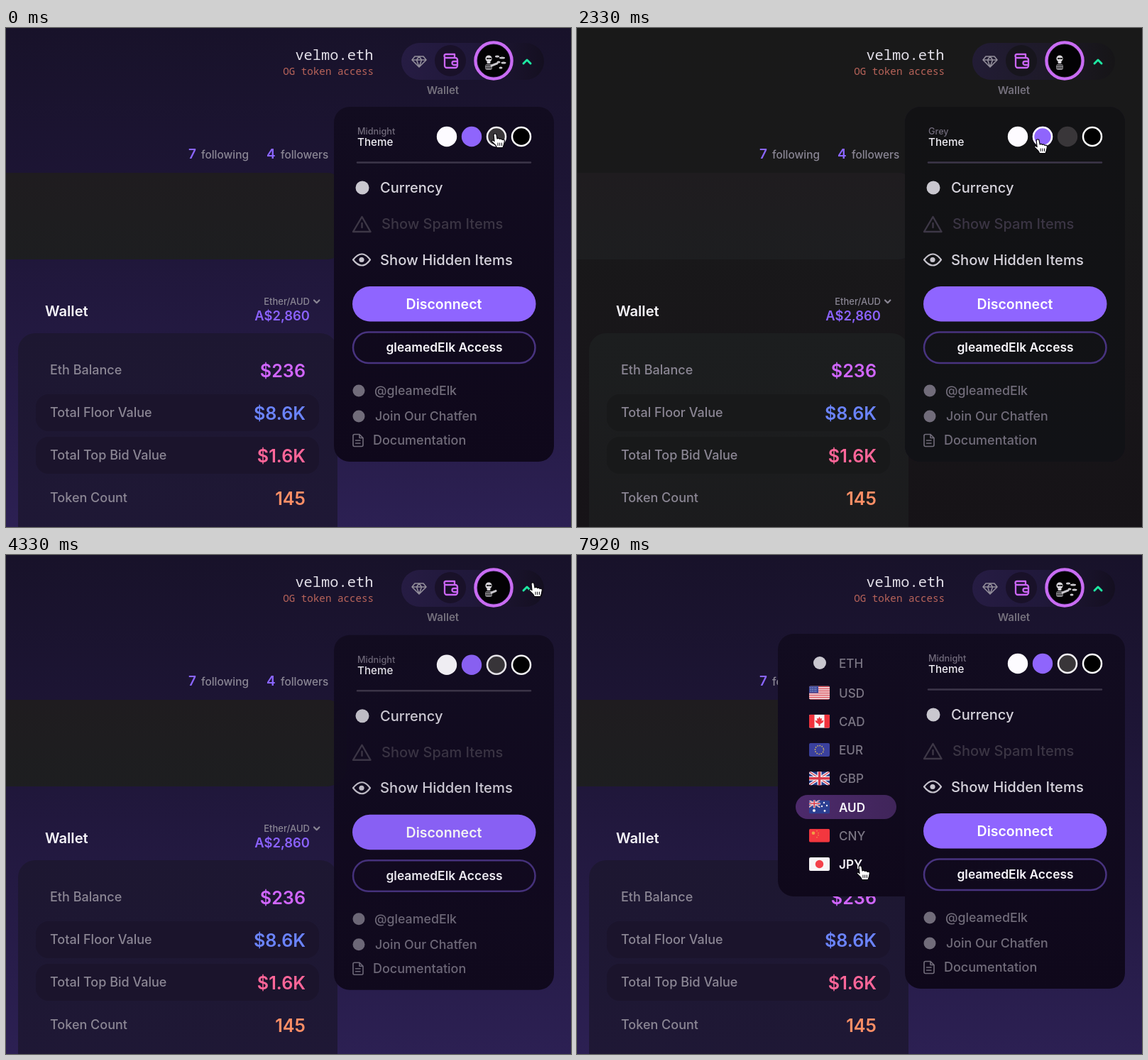
An HTML page for the animation above (8000 ms loop, 796 by 703 pixels).

```html
<!DOCTYPE html>
<html lang="en">
<head>
<meta charset="utf-8">
<title>Wallet menu</title>
<style>
html, body { margin: 0; width: 100%; height: 100%; overflow: hidden; background: #1a1430; }
svg { display: block; width: 796px; height: 703px; }
text { font-family: Inter, "Open Sans", sans-serif; }
.mono { font-family: "Noto Sans Mono", "Liberation Mono", monospace; }
</style>
</head>
<body>
<svg id="stage" viewBox="0 0 796 703" fill="none" stroke-linecap="round" stroke-linejoin="round"></svg>
<script>
const LOOP = 8000, STEP = 1000 / 12;
const stage = document.getElementById('stage');

// Markup helpers
const text = (x, y, size, fill, str, weight = 500, attrs = '') =>
  `<text x="${x}" y="${y}" font-size="${size}" fill="${fill}" font-weight="${weight}" ${attrs}>${str}</text>`;
const rect = (x, y, w, h, r, fill, attrs = '') =>
  `<rect x="${x}" y="${y}" width="${w}" height="${h}" rx="${r}" fill="${fill}" ${attrs}/>`;
const dot = (x, y, r, fill, attrs = '') => `<circle cx="${x}" cy="${y}" r="${r}" fill="${fill}" ${attrs}/>`;
const line = (d, stroke, width, attrs = '') =>
  `<path d="${d}" stroke="${stroke}" stroke-width="${width}" ${attrs}/>`;
const gradient = (id, colors, across) =>
  `<linearGradient id="${id}" x2="${across ? 1 : 0}" y2="${across ? 0 : 1}">` +
  colors.map((c, i) => `<stop offset="${i / (colors.length - 1)}" stop-color="${c}"/>`).join('') +
  '</linearGradient>';
const END = 'text-anchor="end"', MID = 'text-anchor="middle"';

const themes = {
  night: { page: ['#18122a', '#1d1535', '#241a43', '#2c2053'], band: ['#1b1528', '#1a1429'],
    card: ['#1d1731', '#1f1836'], row: '#1b142c', pill: ['#261c43', '#20183a', '#140f20'],
    hole: '#191129', panel: ['#120c20', '#0f081b'] },
  grey: { page: ['#191919', '#19191a', '#181619', '#161317'], band: ['#1f1c1f', '#1d1e20'],
    card: ['#1c1e1f', '#1b1b1d'], row: '#18191a', pill: ['#221c35', '#1e1a29', '#161517'],
    hole: '#17151d', panel: ['#121214', '#111216'] }
};

const themeDefs = Object.entries(themes).map(([name, c]) =>
  gradient(name + 'Page', c.page) + gradient(name + 'Band', c.band) + gradient(name + 'Card', c.card) +
  gradient(name + 'Pill', c.pill, true) + gradient(name + 'Panel', c.panel)).join('');

const band = name => rect(-40, 204, 520, 122, 28, `url(#${name}Band)`);
const page = name => {
  const c = themes[name];
  return rect(0, 0, 796, 703, 0, `url(#${name}Page)`) +
    rect(17, 430, 450, 320, 24, `url(#${name}Card)`) +
    rect(42, 516, 399, 52, 18, c.row) + rect(42, 576, 399, 52, 18, c.row) +
    rect(557, 21, 201, 52, 26, `url(#${name}Pill)`) + dot(626, 46, 22, c.hole);
};

const stats = [
  ['Eth Balance', '$236', '#d166ff', 488], ['Total Floor Value', '$8.6K', '#6b84ff', 548],
  ['Total Top Bid Value', '$1.6K', '#ff6699', 608], ['Token Count', '145', '#ff8f66', 668]
];

const header =
  text(517.5, 45, 20.4, '#e4e1ea', 'velmo.eth', 300, `class="mono" ${END}`) +
  text(518, 66, 14.2, '#b9645a', 'OG token access', 400, `class="mono" ${END}`) +
  line('M576 40h12l4 5-10 10-10-10zM572 45h20M578.5 45l3.500 10 3.500-10-3.500-5z', '#928e9a', 1.6) +
  line('M618 41v12a3 3 0 0 0 3 3h12a3 3 0 0 0 3-3v-8a3 3 0 0 0-3-3h-13a2.500 2.500 0 0 1 0-5h12v4M636 47h-5a2 2 0 0 0 0 5h5',
    '#cb66f5', 2.3) +
  text(615.5, 93, 15.1, '#74707c', 'Wallet', 600, MID);

const summary =
  text(257, 184, 19, '#8b66ff', '7', 600) + text(275, 184, 15.4, '#8a8694', 'following') +
  text(367, 184, 19, '#8b66ff', '4', 600) + text(387, 184, 15.4, '#8a8694', 'followers') +
  text(55, 406, 20.2, '#f5f3f8', 'Wallet', 600) +
  text(428, 390, 13, '#8a8694', 'Ether/AUD', 500, END) + line('M434 383.500l3.700 3.700 3.700-3.700', '#8a8694', 2.2) +
  text(428, 412, 18.4, '#8b62ff', 'A$2,860', 600, END) +
  stats.map(([label, value, color, y]) =>
    text(62, y, 18, '#8b8694', label) + text(422, y + 4, 25.2, color, value, 600, END)).join('');

const avatar =
  dot(687, 46, 22.5, '#030204') +
  '<g id="figure" fill="#d8d6da"><circle cx="680" cy="43" r="4.600"/><rect x="677.500" y="47" width="5" height="3" rx="1"/>' +
  '<rect x="675" y="51" width="10" height="8" rx="3" fill="#8d8b90"/><path d="M676 53h8M676 56h8" stroke="#111" stroke-width="1"/>' +
  '<path d="M678 43h1.500M681.500 43h1.500" stroke="#111" stroke-width="2"/></g>' +
  line('M684 53', '#c9c7cc', 3, 'id="arm"') +
  '<g id="flecks">' + [[692, 40, 3], [699, 42, 4], [694, 48, 2.5], [701, 49, 3.5], [697, 56, 2.5]].map(
    ([x, y, r]) => `<ellipse cx="${x}" cy="${y}" rx="${r}" ry="1.500" fill="#c9c7cc"/>`).join('') + '</g>' +
  '<circle id="glow" stroke="#1ee8a2" stroke-width="3.500"/><circle id="ring" stroke="#c96cf3"/>' +
  line('', '#000', 3, 'id="chevron"');

// Flags share a 29 by 19 box
const jack = '<rect width="29" height="19" fill="#28408f"/>' +
  line('M0 0L29 19M29 0L0 19', '#f2f0f4', 4) + line('M0 0L29 19M29 0L0 19', '#d83a4a', 1.3) +
  line('M14.500 0v19M0 9.500h29', '#f2f0f4', 6) + line('M14.500 0v19M0 9.500h29', '#d83a4a', 3.4);
const field = color => `<rect width="29" height="19" fill="${color}"/>`;
const flags = {
  USD: field('#f4f1f4') + line('M0 1h29M0 4h29M0 7h29M0 10h29M0 13h29M0 16h29M0 19h29', '#db4650', 1.5) +
    rect(0, 0, 13, 10, 0, '#3f4b9b') + line('M2 2.500h10M2 5h10M2 7.500h10', '#d8d8ec', 1, 'stroke-dasharray="0.1 2.400"'),
  CAD: field('#f7f4f5') + rect(0, 0, 7.5, 19, 0, '#f0323c') + rect(21.5, 0, 7.5, 19, 0, '#f0323c') +
    '<path d="M14.500 3l1.500 3 2-1-.5 4 3-1-1 3-4 2.500v2.500h-2v-2.500l-4-2.500-1-3 3 1-.5-4 2 1z" fill="#f0323c"/>',
  EUR: field('#3a409d') + '<circle cx="14.500" cy="9.500" r="6" stroke="#d4b95c" stroke-width="1.700" stroke-dasharray="0.100 3.042"/>',
  GBP: jack,
  AUD: field('#2b3f92') + `<g transform="scale(.5)">${jack}</g>` +
    [[7, 14.5, 2], [21, 3.5, 1.2], [25, 7.5, 1.2], [18, 8.5, 1.2], [22, 15, 1.4]].map(s => dot(...s, '#eceaf3')).join(''),
  CNY: field('#f3373f') + dot(6, 6, 2.3, '#f0a046') +
    [[11, 3], [13, 6], [13, 9], [11, 12]].map(([x, y]) => dot(x, y, .8, '#f0a046')).join(''),
  JPY: field('#f8f5f7') + dot(14.5, 9.5, 5.7, '#f4414b')
};
const codes = ['ETH', ...Object.keys(flags)];
const rowY = i => i ? 194 + (i - 1) * 40.25 : 152;

const submenu = '<g id="submenu">' +
  rect(283, 111, 220, 370, 22, 'url(#nightPanel)') +
  rect(283, 111, 220, 370, 22, 'url(#greyPanel)', 'class="greyFade"') +
  rect(308, 338, 142, 34, 17, 'url(#chosen)') +
  codes.map((code, i) =>
    (i ? `<g transform="translate(327 ${rowY(i) - 9.5})" clip-path="url(#flagBox)">${flags[code]}</g>`
       : dot(342, 152, 9, '#c9c7cf')) +
    text(369, rowY(i) + 6.5, 17.1, '#7b7684', code, 500, 'class="code"')).join('') + '</g>';

const panel = '<g id="panel">' + submenu +
  rect(462, 111, 310, 500, 22, 'url(#nightPanel)') +
  rect(462, 111, 310, 500, 22, 'url(#greyPanel)', 'class="greyFade"') +
  text(495, 150, 12.7, '#716b7b', '', 500, 'id="themeName"') +
  text(495, 166, 15.2, '#f0eef4', 'Theme') +
  dot(621, 153, 14.2, '#fdfbff') +
  dot(656, 153, 14.2, '#8f65fc') + dot(656, 153, 13, 'none', 'id="purpleRing" stroke="#fff" stroke-width="2.500"') +
  dot(691, 153, 14.2, '#393639') + dot(691, 153, 13, 'none', 'id="greyRing" stroke="#f2f0f4" stroke-width="2.500"') +
  dot(726, 153, 13, '#000', 'stroke="#fff" stroke-width="2.500"') +
  line('M495 189.500H739', '#3d3649', 2.4) +
  dot(502, 225, 9.5, '#c9c7cf') + text(527, 232, 20, '#d6d3dc', 'Currency') +
  line('M501.500 266l12 21h-24.500zM501.500 275v6', '#3d3746', 2.4) + text(529, 283, 20, '#3b3544', 'Show Spam Items') +
  line('M489 326.500q12.500-16 24 0q-11.500 16-24 0z', '#c6c3cc', 2.2) + dot(501, 326.5, 3.6, '#c6c3cc') +
  text(527, 333.5, 20.2, '#d6d3dc', 'Show Hidden Items') +
  rect(488, 364, 258.5, 49.5, 24.7, '#8f65ff') + text(617, 396, 19.5, '#fff', 'Disconnect', 600, MID) +
  rect(489, 428.5, 256.5, 43.5, 21.7, 'none', 'stroke="#48337f" stroke-width="2.500"') +
  text(617.5, 456, 17.4, '#f7f5fa', 'gleamedElk Access', 600, MID) +
  dot(497, 511, 8.5, '#716c7a') + text(519, 517, 17.8, '#716c7a', '@gleamedElk') +
  dot(497, 547, 8.5, '#716c7a') + text(520, 553, 17.8, '#716c7a', 'Join Our Chatfen') +
  line('M498 572.500h-7a2 2 0 0 0-2 2v13a2 2 0 0 0 2 2h10a2 2 0 0 0 2-2v-10zv5h5M492.500 581h6.500M492.500 585h6.500', '#716c7a', 1.6) +
  text(517, 587, 18, '#716c7a', 'Documentation') + '</g>';

const cursors =
  '<g id="hand"><path d="M-2 1.500C-2-.8 2-.8 2 1.500L3 7C4 6 6 6 6.500 7.500 8 6.500 9.500 7 10 8.500c2-1 3.500 0 3.300 2L12.500 15 11 19.500H2.500L1 16.500-4 11.500c-1.500-2 .5-3.500 3-1z" fill="#fff" stroke="#08060c" stroke-width="1.200"/>' +
  line('M4 13v3.500M6.700 13v3.500M9.400 13v3.500', '#08060c', 1) + '</g>' +
  '<path id="arrow" d="M.5 1V18L4.500 14.500 7 20.500 10 19 7.500 13.500H13z" fill="#08060c" stroke="#f5f3f8" stroke-width="1.500"/>';

stage.innerHTML = '<defs>' + themeDefs + gradient('chosen', ['#4d2a6b', '#40255a'], true) +
  '<clipPath id="flagBox"><rect width="29" height="19" rx="2"/></clipPath></defs>' +
  page('night') + `<g class="greyFade">${page('grey')}</g>` +
  band('night') + `<g id="greyBand">${band('grey')}</g>` +
  header + summary + avatar + panel + cursors;

// Motion tables: time, then values
const cursorPath = [
  [0, 689, 149], [500, 689, 150], [1050, 740, 46], [1550, 741, 46], [2200, 649, 157], [2900, 650, 157],
  [3170, 649, 153], [3350, 649, 153], [3900, 742, 42], [4400, 742, 39], [4900, 570, 222], [5080, 560, 222],
  [5350, 400, 300], [5550, 400, 440], [5680, 430, 520], [5850, 400, 350], [6300, 495, 190], [6480, 495, 190],
  [6800, 400, 192], [7300, 398, 300], [7800, 399, 438]
];
const greyKeys = [[250, 0], [550, 1], [2700, 1], [3100, 0]];
const lateGreyKeys = [[250, 0], [600, 1], [2850, 1], [3300, 0]];
const panelKeys = [[500, 1], [800, 0], [1450, 0], [1700, 1], [3135, 1], [3435, 0], [4120, 0], [4370, 1]];
const submenuKeys = [[4800, 0], [5000, 1]];
const hoverKeys = [[1000, 0], [1180, 1], [1450, 1], [1600, 0], [3800, 0], [3950, 1], [4120, 1], [4280, 0]];
const armKeys = [[0, 8], [1250, 7], [2000, 0], [3300, 0], [4330, 6], [6420, 18], [7600, 8]];
const fleckKeys = [[1300, 1], [2100, 0], [6420, 0], [7400, 1]];
const openSpans = [[0, 480], [1450, 3120], [4120, LOOP]];
const handSpans = [[0, 560], [1000, 1620], [2130, 2960], [3800, 4480], [4780, 5950], [6640, LOOP]];

const within = (spans, t) => spans.some(([a, b]) => t >= a && t < b);
function track(keys, t) {
  const next = keys.findIndex(k => k[0] > t);
  if (next < 0) return keys[keys.length - 1].slice(1);
  if (next === 0) return keys[0].slice(1);
  const a = keys[next - 1], b = keys[next];
  const u = (t - a[0]) / (b[0] - a[0]), e = u * u * (3 - 2 * u);
  return a.slice(1).map((v, i) => v + (b[i + 1] - v) * e);
}

const el = id => document.getElementById(id);
const set = (node, attrs) => { for (const k in attrs) node.setAttribute(k, attrs[k]); };
const codeLabels = [...document.querySelectorAll('.code')];
const greyLayers = [...document.querySelectorAll('.greyFade')];

function draw(t) {
  const [grey] = track(greyKeys, t), [lateGrey] = track(lateGreyKeys, t);
  greyLayers.forEach(n => set(n, { opacity: grey }));
  set(el('greyBand'), { opacity: lateGrey });
  set(el('purpleRing'), { opacity: lateGrey });
  set(el('greyRing'), { opacity: 1 - lateGrey });
  el('themeName').textContent = grey > .5 ? 'Grey' : 'Midnight';

  const [shown] = track(panelKeys, t);
  set(el('panel'), { opacity: shown, transform: `translate(0 ${(1 - shown) * 30})` });
  set(el('submenu'), { opacity: track(submenuKeys, t)[0] });

  const open = within(openSpans, t);
  set(el('chevron'), { d: open ? 'M729 50l5-5 5 5' : 'M729 44.500l5 5 5-5', stroke: open ? '#1ee8a2' : '#c061f0' });
  const [hover] = track(hoverKeys, t);
  set(el('ring'), { cx: 687 - hover, cy: 46 - hover, r: 25.6 - 2 * hover, 'stroke-width': 4.3 - hover });
  set(el('glow'), { cx: 687 + 2 * hover, cy: 46 + 2 * hover, r: 22.5, opacity: hover });

  const [reach] = track(armKeys, t);
  set(el('arm'), { d: `M684 53L${684 + reach} ${53 - reach * .4}`, opacity: reach ? 1 : 0 });
  set(el('flecks'), { opacity: track(fleckKeys, t)[0] });

  const [x, y] = track(cursorPath, t), hand = within(handSpans, t);
  set(el('hand'), { transform: `translate(${x} ${y})`, opacity: +hand });
  set(el('arrow'), { transform: `translate(${x} ${y})`, opacity: +!hand });
  codeLabels.forEach((n, i) => {
    const over = t > 5000 && hand && x > 308 && x < 451 && Math.abs(y - rowY(i)) < 18;
    const lit = over || codes[i] === 'AUD';
    set(n, { fill: lit ? '#f7f5fa' : '#7b7684', 'font-weight': lit ? 600 : 500 });
  });
}

function tick() {
  const t = performance.now() % LOOP;
  draw(Math.floor((t + 6) / STEP) * STEP % LOOP);
  requestAnimationFrame(tick);
}
tick();
</script>
</body>
</html>
```
